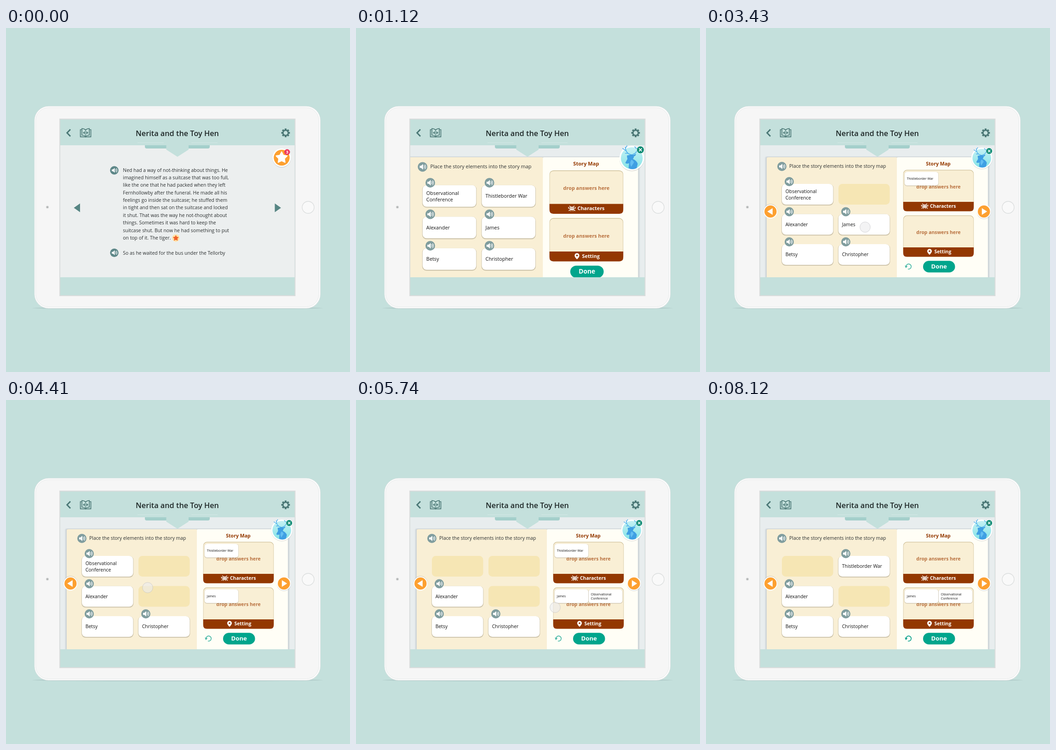
Write an HTML page that moves like this. It is 748 px wide and 748 px high and loops after 8890 ms.

```html
<!DOCTYPE html>
<html lang="en">
<head>
<meta charset="utf-8">
<title>Story map on a tablet</title>
<style>
html, body { margin: 0; width: 100%; height: 100%; overflow: hidden; background: #c4e0dc; }
svg { display: block; width: 100vw; height: 100vh; }
text { font-family: "Open Sans", sans-serif; font-size: 10.4px; fill: #2b2f30; }
.title { font-size: 16.3px; font-weight: 600; fill: #1d2626; }
.b { font-weight: 700; }
.mid { text-anchor: middle; }
</style>
</head>
<body>
<svg id="stage" viewBox="0 0 748 748"></svg>
<script>
const LOOP = 8890, STEP = 70;
const TEAL = '#4b7876', BROWN = '#933801', CREAM = '#f9efd5';

// ---------- drawing helpers ----------
const rect = (x, y, w, h, fill, r = 0, more = '') =>
  `<rect x="${x}" y="${y}" width="${w}" height="${h}" rx="${r}" fill="${fill}" ${more}/>`;
const circle = (x, y, r, fill, more = '') =>
  `<circle cx="${x}" cy="${y}" r="${r}" fill="${fill}" ${more}/>`;
const path = (d, fill = 'none', more = '') => `<path d="${d}" fill="${fill}" ${more}/>`;
const line = (d, color, w, more = '') =>
  path(d, 'none', `stroke="${color}" stroke-width="${w}" ${more}`);
const text = (s, x, y, cls = '', more = '') =>
  `<text x="${x}" y="${y}" class="${cls}" ${more}>${s}</text>`;
const group = (id, body, more = '') => `<g id="${id}" ${more}>${body}</g>`;
const put = (x, y, body, s = 1) => `<g transform="translate(${x} ${y}) scale(${s})">${body}</g>`;

function star(x, y, r, fill) {
  const pts = Array.from({ length: 10 }, (_, i) => {
    const a = i * Math.PI / 5 - Math.PI / 2, q = i % 2 ? r * 0.52 : r;
    return `${(x + q * Math.cos(a)).toFixed(2)},${(y + q * Math.sin(a)).toFixed(2)}`;
  });
  return `<polygon points="${pts.join(' ')}" fill="${fill}" stroke="${fill}"
    stroke-width="${r * 0.16}" stroke-linejoin="round"/>`;
}

const speaker = (x, y, r, fill) => put(x, y,
  circle(0, 0, 10, fill) +
  path('M-6-2.2h3l4-3.6v11.6l-4-3.6h-3z', '#fff') +
  line('M3-2.6q2 2.6 0 5.2M5-4.4q3.4 4.4 0 8.8', '#fff', 1.2, 'stroke-linecap="round"'), r / 10);

function gear(x, y) {
  let teeth = '';
  for (let i = 0; i < 8; i++) {
    teeth += `<rect x="-2.1" y="-9.4" width="4.2" height="4" rx=".8" fill="${TEAL}"
      transform="rotate(${i * 45})"/>`;
  }
  return put(x, y, teeth + circle(0, 0, 5.7, 'none', `stroke="${TEAL}" stroke-width="2.7"`));
}

// ---------- scenery ----------
const tablet =
  `<ellipse cx="373" cy="609" rx="316" ry="3" fill="#a9c4c1" opacity=".6"/>` +
  rect(61.5, 169.8, 622.5, 440.2, '#e1e5e5', 31) +
  rect(62.5, 170.8, 620.5, 438, '#fff', 30) +
  rect(64.5, 173, 616, 433.5, '#f6f6f6', 28, 'stroke="#e6e9e9"') +
  circle(90, 389.5, 3, '#cfd1d1') + circle(90, 389.5, 1.5, '#a9abab') +
  circle(657, 390, 13, '#f9f9f9', 'stroke="#dadddd" stroke-width="1.3"') +
  rect(116, 197, 513.5, 386, '#d9dcdc') +
  rect(118, 199, 509.5, 382, '#c4e0dc') +
  rect(118, 255, 509.5, 287, '#ecefef');

const book =
  line('M164 221h-2.3v15.6h9q2.4 1.2 4.8 0h9V221h-2.3', TEAL, 1.7) +
  line('M173.1 221.5q-4-3-8-3v14.5q4 0 8 2.6q4-2.6 8-2.6v-14.5q-4 0-8 3z', TEAL, 1.7) +
  line('M173.1 221v14', TEAL, 1.2) +
  path('M171.2 224.5v6.4l-4-3.2zM175 224.5v6.4l4-3.2z', TEAL);

const header =
  line('M140 220.5l-7.2 7.5l7.2 7.5', TEAL, 3) + book + gear(608, 228) +
  text('Nerita and the Toy Hen', 372.5, 234.7, 'title mid') +
  line('M286 249.5h57M403 249.5h57', '#d3e8e5', 1);

const ribbon =
  path('M302 255h141v3q0 4-4 4H306q-4 0-4-4z', '#a4cfcb') +
  path('M348.5 255h48.5v9.5L372.8 280l-24.3-15.5z', '#c4e0dc');

const story = [
  'Ned had a way of not-thinking about things. He',
  'imagined himself as a suitcase that was too full,',
  'like the one that he had packed when they left',
  'Fernhollowby after the funeral. He made all his',
  'feelings go inside the suitcase; he stuffed them',
  'in tight and then sat on the suitcase and locked',
  'it shut. That was the way he not-thought about',
  'things. Sometimes it was hard to keep the',
  'suitcase shut. But now he had something to put',
  'on top of it. The tiger.'
].map((s, i) => text(s, 254.3, 312.6 + i * 16.37)).join('') +
  text('So as he waited for the bus under the Tellorby', 254.3, 492.7) +
  circle(369.3, 456.7, 8, '#ffe2a6') + star(369.3, 457, 6, '#f0622a') +
  speaker(235.5, 309.5, 9.2, '#5d8788') + speaker(235.5, 488.7, 9.2, '#5d8788') +
  path('M147.5 391l13.5-9.5v19zM598 391l-13.5-9.5v19z', '#568583');

const starButton =
  circle(599.6, 283.4, 20, '#000', 'opacity=".13"') + circle(599.5, 282, 20, '#fff') +
  circle(599.5, 282, 17.3, '#fda030') + star(599.3, 282, 12.6, '#fff') +
  circle(611.3, 269.8, 6.2, '#ef365d') +
  text('3', 611.3, 273.2, 'b mid', 'style="font-size:9px;fill:#fff"');

// ---------- story map panel ----------
const COLS = [165, 288], ROWS = [339, 404.5, 470], W = 111.5, H = 45;
const cards = [
  { id: 'obs', lines: ['Observational', 'Conference'], col: 0, row: 0 },
  { id: 'war', lines: ['Thistleborder War'], col: 1, row: 0 },
  { id: 'alex', lines: ['Alexander'], col: 0, row: 1 },
  { id: 'james', lines: ['James'], col: 1, row: 1 },
  { id: 'betsy', lines: ['Betsy'], col: 0, row: 2 },
  { id: 'chris', lines: ['Christopher'], col: 1, row: 2 }
];
for (const c of cards) c.home = [COLS[c.col] + W / 2, ROWS[c.row] + H / 2, 1];

const cardFace = c => group(c.id,
  rect(-W / 2 - .8, -H / 2, W + 1.6, H + 1.8, '#6d6450', 9, 'opacity=".33"') +
  rect(-W / 2, -H / 2, W, H, '#fff', 8.5) +
  c.lines.map((s, i) => text(s, -48, c.lines.length > 1 ? -2.4 + i * 13.4 : 3.9,
    '', 'style="fill:#141414"')).join(''));
const cardSpeaker = c => group(c.id + 'Sound', speaker(COLS[c.col] + 16, ROWS[c.row] - 5, 10, '#809d9e'));

const critter = put(475.5, 387.5,
  rect(-4, -3.5, 8, 6.5, '#fff', 2) +
  line('M-3-3l-2-2.5M3-3l2-2.5M-4-.5h-3v-2.5M4-.5h3v-2.5M-3.5 2l-3 3M3.5 2l3 3M-1.5 3l-1 2.5M1.5 3l1 2.5', '#fff', 1.4) +
  circle(-1.7, -.7, 1, BROWN) + circle(1.7, -.7, 1, BROWN));
const pin = path('M486 493.3q-5-5-5-8a5 5 0 0 1 10 0q0 3-5 8z', '#fff') + circle(486, 485.3, 1.8, BROWN);

const zone = (y, label, x, icon) =>
  rect(428.8, y - .5, 153.4, 88, '#c7b78d', 8.5) +
  rect(429.4, y + .6, 152.2, 86, CREAM, 8) +
  path(`M428.8 ${y + 69}h153.4v12.5q0 8-8 8H436.8q-8 0-8-8z`, BROWN) +
  text('drop answers here', 505.5, y + 40.2, 'b mid', 'style="fill:#b9713f"') +
  icon + text(label, x, y + 82.3, 'b', 'style="fill:#fff"');

const undo =
  line('M435 519.2a5.6 5.6 0 1 1 4.6 5', '#08a08a', 1.6, 'stroke-linecap="round"') +
  path('M432.3 516.6l6.1 1.2l-3.9 4.4z', '#08a08a');

const outline = group('outline', [309, 408].map(y =>
  rect(428.8, y, 153.4, 89, 'none', 8.5, 'stroke="#b9713f" stroke-width="1"')).join(''));

const panel =
  [4, 2.5, 1].map(d => rect(132 - d, 281 - d / 2, 481 + 2 * d, 290, '#8f9a9f', 4, 'opacity=".13"')).join('') +
  rect(132, 281, 284, 290, CREAM, 3) + rect(415, 281, 198, 290, '#fffef6', 2) +
  speaker(165, 301, 10, '#809d9e') +
  text('Place the story elements into the story map', 181, 304) +
  text('Story Map', 505, 298.6, 'b mid', `style="font-size:10.6px;fill:${BROWN}"`) +
  cards.map(c => rect(COLS[c.col], ROWS[c.row], W, H, '#f6e6b4', 8.5)).join('') +
  zone(309, 'Characters', 487, critter) + zone(408, 'Setting', 496.5, pin) + outline +
  rect(472, 506.3, 69.5, 25.2, '#00a58c', 12.6) +
  text('Done', 506.7, 523.2, 'b mid', 'style="font-size:13.2px;fill:#fff"') +
  group('undo', undo) +
  [...cards].reverse().map(c => cardFace(c) + cardSpeaker(c)).join('');

// Avatar, drawn around its own centre
const avatar =
  circle(0, 1.3, 23, '#000', 'opacity=".12"') + circle(0, 0, 23, '#fff') +
  circle(0, 0, 20.3, 'url(#sky)') +
  line('M-3-7q-8-2-9-13M-11-14l-6-4M-12-18l3-5M-7-9l-5 0M2-7q8-2 8-12M9-13l4-4M9.5-17l-4-4', '#4fb0ec', 1.4, 'stroke-linecap="round"') +
  path('M-9-5l5-1q3-2 7 0l5-2q-1 4-4 4.500q0 3-2 5q7 3 9 9l-2 8q-8 4-15 0l1-9q-6 2-7-1l4-7q-1-3-1-6.500z', '#3f9fe3') +
  path('M-1 3q4 1 5 5l-5 8q-4-6 0-13z', '#63bdf2') +
  circle(16, -15.5, 7.2, '#fff') + circle(16, -15.5, 6.5, '#0b8a72') +
  line('M13.3-18.2l5.4 5.4M18.7-18.2l-5.4 5.4', '#fff', 1.5);

const arrow = circle(0, 1.2, 15.3, '#000', 'opacity=".13"') + circle(0, 0, 15.2, '#fff') +
  circle(0, 0, 13.2, '#fda030') + path('M-4.5-7.2L7 0L-4.5 7.2z', '#fff');

document.getElementById('stage').innerHTML =
  `<defs><clipPath id="page"><rect x="118" y="255" width="509.5" height="287"/></clipPath>
   <linearGradient id="sky" x2="0" y2="1"><stop stop-color="#c4f1f4"/><stop offset="1" stop-color="#86e3e6"/></linearGradient></defs>` +
  tablet + header +
  `<g clip-path="url(#page)">` + story + group('starButton', starButton) +
  group('panel', rect(0, 255, 748, 290, '#dfe7ec', 0, 'opacity=".3"') + panel) +
  `</g>` + ribbon +
  `<g clip-path="url(#page)">` + group('avatar', avatar) +
  group('prev', arrow) + group('next', arrow) + `</g>` +
  group('cursor', circle(0, 0, 11.3, '#ececee', 'fill-opacity=".62" stroke="#b9b9bd" stroke-opacity=".6" stroke-width=".9"'));

// ---------- motion ----------
const smooth = u => u * u * (3 - 2 * u);
const linear = u => u;
const out = u => 1 - (1 - u) ** 2;

// Key: [time, values, easing towards this key]
function at(keys, t) {
  if (t <= keys[0][0]) return keys[0][1];
  for (let i = 1; i < keys.length; i++) {
    const [t1, b, ease = smooth] = keys[i];
    if (t < t1) {
      const [t0, a] = keys[i - 1], u = ease((t - t0) / (t1 - t0));
      return a.map((v, j) => v + (b[j] - v) * u);
    }
  }
  return keys[keys.length - 1][1];
}

const panelScale = [[840, [.1]], [1050, [.98], linear], [1120, [1.046], out], [1260, [1.015]], [1400, [.994]], [1540, [1]]];
const avatarScale = [[840, [.3]], [1050, [1.1], linear], [1120, [1.17], out], [1330, [.97]], [1470, [1]]];
const arrowScale = [[1400, [0]], [1680, [1.12], out], [1820, [.96]], [1960, [1]]];

const cursorKeys = [
  [350, [602, 273, 0]], [560, [601, 281, 1], out],
  [1750, [404, 333, 0]], [1820, [398, 336, .5], linear], [1960, [385, 353, 1], linear], [2170, [381, 360, 1], out],
  [2380, [381, 360, 1]], [2800, [500, 340, 1]], [2940, [500, 340, 1]],
  [3360, [346, 433, 1]], [3500, [346, 433, 1]], [4060, [497, 434, 1]],
  [4200, [480, 433, 1]], [4410, [308, 408, 1], linear], [4620, [196, 376, 1], linear],
  [4690, [167, 362, 1], out], [4830, [178, 363, 1]],
  [4970, [178, 363, 1]], [5530, [433, 451, 1]],
  [6090, [433, 451, 1]], [6510, [495, 513, 1]], [6650, [495, 513, 1]], [6860, [495, 513, 0]]
];

const find = id => cards.find(c => c.id === id);
const SMALL = .66;
const moves = {
  war: [[2310, find('war').home], [2800, [475, 341, .8]], [2940, [468.5, 327.7, SMALL], out],
    [7490, [468.5, 327.7, SMALL]], [7980, find('war').home]],
  james: [[3500, find('james').home], [4060, [473, 432, .74]], [4130, [468.5, 426.7, SMALL], out]],
  obs: [[4900, find('obs').home], [5530, [465, 450, .72]], [5740, [542.5, 426.7, SMALL], out]]
};
const between = (t, a, b) => t >= a && t < b;
const $ = id => document.getElementById(id);
const move = (id, x, y, s = 1, r = 0) =>
  $(id).setAttribute('transform', `translate(${x} ${y}) rotate(${r}) scale(${s})`);
const show = (id, o) => $(id).setAttribute('opacity', +o);

function draw(t) {
  const open = t >= 910, k = at(panelScale, t)[0];
  show('panel', open);
  show('avatar', open);
  show('starButton', !open);
  $('panel').setAttribute('transform', `translate(605 281) scale(${k}) translate(-605 -281)`);
  move('avatar', 599.7, 283, at(avatarScale, t)[0]);

  const a = at(arrowScale, t)[0];
  move('prev', 140.3, 399, a, 180);
  move('next', 604.3, 399, a);

  // Checking the answers: right ones swell, the wrong one wiggles
  const u = Math.min(1, Math.max(0, (t - 6580) / 910));
  const swell = 1 + .14 * Math.sin(Math.PI * u);
  const wiggle = 13 * Math.sin(u * Math.PI * 6) * (1 - u);
  for (const c of cards) {
    const keys = moves[c.id];
    const [x, y, s] = keys ? at(keys, t) : c.home;
    const wrong = c.id === 'war';
    move(c.id, x, y, keys && !wrong ? s * swell : s, wrong ? wiggle : 0);
    show(c.id + 'Sound', s === 1);
  }
  show('outline', between(t, 2380, 2940) || between(t, 3570, 4130) || between(t, 4970, 5740) ? .6 : 0);
  show('undo', t < 2870 ? 0 : t < 6650 ? .75 : 1);

  const [x, y, o] = at(cursorKeys, t);
  move('cursor', x, y);
  show('cursor', between(t, 770, 1820) ? 0 : o);
}

function tick(now) {
  draw(Math.floor(now % LOOP / STEP) * STEP);
  requestAnimationFrame(tick);
}
draw(0);
requestAnimationFrame(tick);
</script>
</body>
</html>
```
